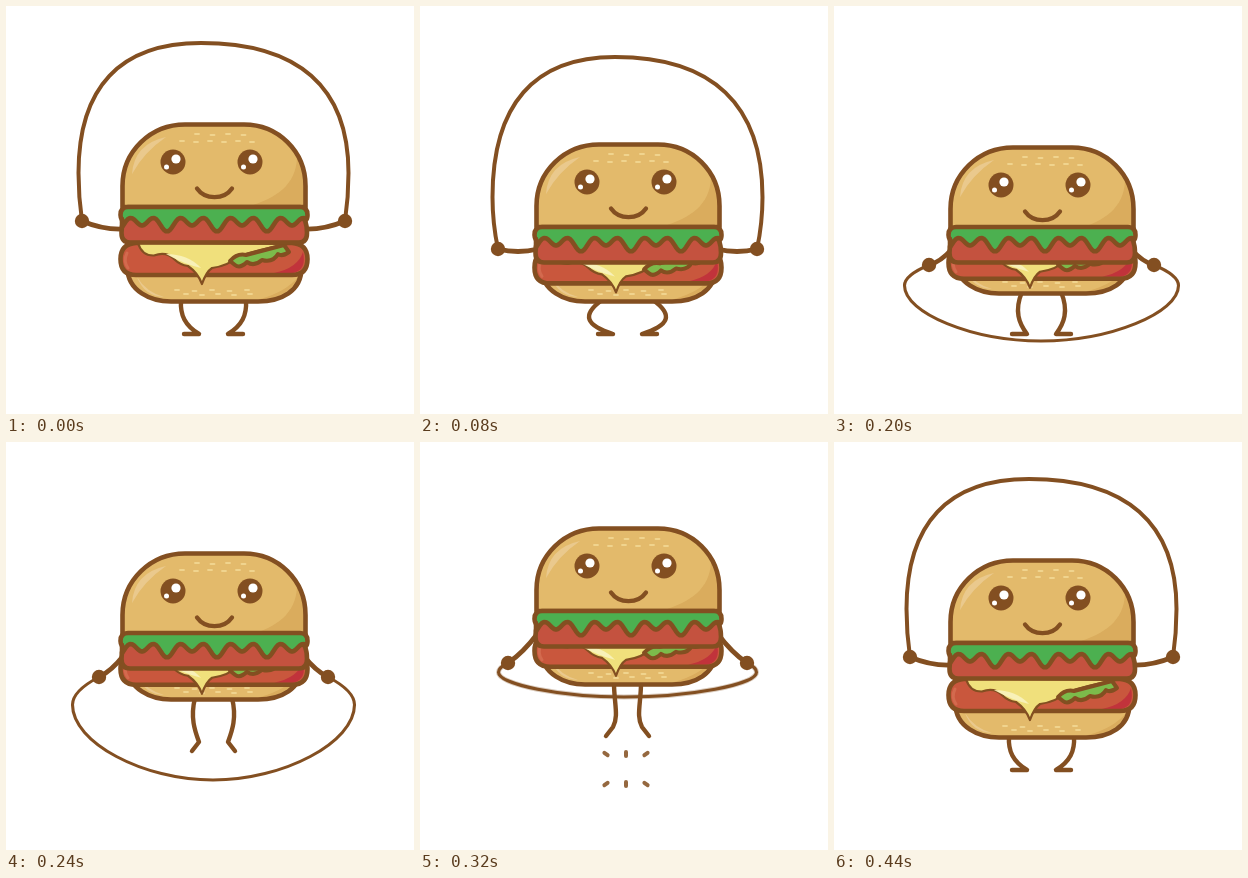
An HTML page with a canvas for the animation above (0.48 s loop, 408 px wide and 408 px high).

```html
<!DOCTYPE html>
<html lang="en">
<head>
<meta charset="utf-8">
<title>Burger skipping rope</title>
<style>
html, body { margin: 0; width: 100%; height: 100%; overflow: hidden; background: #fff; }
canvas { display: block; }
</style>
</head>
<body>
<canvas id="stage" width="408" height="408"></canvas>
<script>
const ctx = document.getElementById('stage').getContext('2d');
const BROWN = '#834f21', BUN = '#e3ba6b', SHADE = '#daac5d', SHINE = '#eac98d', SEED = '#f0d48e';
const STEP = 40, STEPS = 12, CENTER = 207.5, GROUND = 328, OUTLINE = 4.6;

// rise: shift of the bottom bun; squash: how far the layers above sink onto it
const stand = { rise: 0, squash: 0, handX: 76, handY: 215, reach: 135, ropeX: 195, ropeY: 37, hip: 175, knee: 174 };
const squat = { rise: 0, squash: 20, handX: 78, handY: 243, reach: 135, ropeX: 195, ropeY: 51, hip: 182, knee: 161 };
const push = { rise: -8, squash: 28, handX: 95, handY: 259, reach: 137, ropeX: 207, ropeY: 335, hip: 188, knee: 180 };
const leap = { rise: -38, squash: 28, handX: 93, handY: 235, reach: 141, ropeX: 207, ropeY: 338, hip: 189, knee: 184 };
const hang = { rise: -53, squash: 21, handX: 88, handY: 221, reach: 129, ropeX: 204, ropeY: 255, hip: 194, knee: 194 };
const fall = { rise: -52, squash: 22, handX: 88, handY: 223, reach: 128, ropeX: 216, ropeY: 57, hip: 193, knee: 192 };

function mix(a, b, t, bounce = 0, ropeLift = 0) {
  const out = {};
  for (const key in a) out[key] = a[key] + (b[key] - a[key]) * t;
  out.rise -= bounce;
  out.ropeY -= ropeLift;
  return out;
}

const poses = [
  stand, mix(stand, squat, .5, 0, 15), squat, mix(squat, push, 1 / 3), mix(squat, push, 2 / 3), push,
  leap, mix(leap, hang, .55, 3), hang, mix(hang, fall, .5, 3), fall, stand
];

function shape(d, fill, width = 0, color = BROWN) {
  const path = new Path2D(d);
  if (fill) { ctx.fillStyle = fill; ctx.fill(path); }
  if (width) { ctx.lineWidth = width; ctx.strokeStyle = color; ctx.stroke(path); }
}

function dot(x, y, r, color = BROWN) {
  ctx.fillStyle = color;
  ctx.beginPath();
  ctx.arc(x, y, r, 0, 7);
  ctx.fill();
}

function shifted(dy, draw) {
  ctx.save();
  ctx.translate(0, dy);
  draw();
  ctx.restore();
}

function bothSides(draw) {
  draw();
  ctx.save();
  ctx.translate(2 * CENTER, 0);
  ctx.scale(-1, 1);
  draw();
  ctx.restore();
}

function seedRow(x, y, gap, count) {
  for (let i = 0; i < count; i++) shape(`M${x + i * gap - 2} ${y + i % 2}h4`, null, 1.8, SEED);
}

// Lettuce edge: every second drip hangs deeper
function frill() {
  let d = '';
  for (let x = 116; x <= 300; x += 2) {
    const a = (x - 211) * Math.PI / 25;
    d += `L${x} ${217.3 + 5.2 * Math.cos(2 * a) + 3 * Math.cos(a)}`;
  }
  return d;
}

function topBun() {
  const d = 'M116.5 201V180C116.5 145 145 118.5 179 118.5H238C272 118.5 299.5 145 299.5 180V201Z';
  shape(d, BUN);
  shape('M291 147C292 175 275 190 247 199H298V176Q298 160 291 147Z', SHADE);
  shape('M160 131Q128 138 126 168Q138 146 160 131Z', SHINE);
  seedRow(191, 128, 15.5, 4);
  seedRow(176, 135, 14, 6);
  shape(d, null, OUTLINE);
  for (const x of [167, 244]) {
    dot(x, 156, 12.5);
    dot(x + 3, 153, 4.6, '#fff');
    dot(x - 6.5, 161, 2.5, '#fff');
  }
  shape('M191 182.5C199 194 218 194 226 182.5', null, 4.3);
}

function upperPatty() {
  const edge = frill(), leaf = 'M116 214Q114.5 212 114.5 209Q114.5 201 122 201H294Q301.5 201 301.5 209Q301.5 213 300 214';
  shape('M124 208H293Q301 212 301 227Q301 236.5 293 236.5H124Q115.5 236.5 115.5 227Q115.5 212 124 208Z', '#c4523f', OUTLINE);
  shape(leaf + 'L300 214L116 214', '#4cb050');
  shape('M116 213' + edge, '#4cb050', OUTLINE);
  shape(leaf, null, OUTLINE);
}

function lowerPatty() {
  const d = 'M130 237H286Q301.5 238 301.5 253Q301.5 269 286 269H130Q114.5 269 114.5 253Q114.5 238 130 237Z';
  shape(d, '#c9573d');
  shape('M297 246Q292 262 268 267H287Q301 264 297 246Z', '#c1333b');
  shape('M121 247Q117 255 122 262', null, 3, '#d36a4e');
  shape(d, null, OUTLINE);
  shape('M132 237Q136 250 148 249.5Q160 245 168 253Q174 259 182 260Q192 267 196 278Q200 266 206 262Q222 260 233 250Q255 243 282 238Z', '#f0e07c', 2.2);
  shape('M160 248Q182 248 195 262Q178 258 160 248Z', '#f8f1b8');
  shape('M224 255Q231 247 240 249L278 239L283 246Q276 251 272 248Q267 257 256 254Q248 261 241 256Q234 263 229 259Z', '#7cbb4b', 4);
}

function bottomBun() {
  const d = 'M121.5 262C121.5 285 145 295.5 165 295.5H252C275 295.5 295.5 285 295.5 262Z';
  shape(d, BUN);
  shape('M293 270Q280 286 254 293Q282 293 293 270Z', SHADE);
  shape('M131 271Q140 286 158 291Q138 290 131 271Z', SHINE);
  seedRow(171, 284, 17.5, 5);
  seedRow(180, 288, 16, 5);
  shape(d, null, OUTLINE);
}

function drawRope({ handX, handY, reach, ropeX, ropeY }, blurred) {
  const up = ropeY < handY, k = up ? .66 : .5;
  const sideY = handY + .27 * (ropeY - handY), endY = sideY + k * (ropeY - sideY), bendY = (handY + sideY) / 2;
  const left = CENTER - reach, right = CENTER + reach;
  const d = `M${handX} ${handY}Q${left} ${bendY} ${left} ${sideY}
    C${left} ${endY} ${ropeX + k * (left - ropeX)} ${ropeY} ${ropeX} ${ropeY}
    C${ropeX + k * (right - ropeX)} ${ropeY} ${right} ${endY} ${right} ${sideY}
    Q${right} ${bendY} ${2 * CENTER - handX} ${handY}`;
  if (blurred) shape(d, null, 5, 'rgba(131,79,33,.3)');
  shape(d, null, up ? 4 : 3.1);
}

// Feet stay on the ground until the legs are fully stretched
function drawLeg({ rise, hip, knee }) {
  const top = 294 + rise, foot = Math.min(GROUND, 338 + rise), length = foot - top;
  const toe = foot === GROUND ? 'h-15' : 'l-7 9';
  shape(`M${hip} ${top}C${knee} ${top + length * .45} ${knee + 5} ${top + length * .75} 193 ${foot}${toe}`, null, 4.4);
}

function drawArm({ handX, handY }, shoulderY) {
  shape(`M${handX} ${handY}Q${(handX + 118) / 2} ${(handY + shoulderY) / 2 + 5} 118 ${shoulderY}`, null, 4.8);
  dot(handX, handY, 7.2);
}

function drawDust(age) {
  const spread = .7 + .3 * age, half = 3 - age;
  for (const x of [-20, 0, 20]) for (const y of [-15, 15]) {
    const r = Math.hypot(x, y), a = spread - half / r, b = spread + half / r;
    shape(`M${206 + x * a} ${327 + y * a}L${206 + x * b} ${327 + y * b}`, null, 4, '#95683f');
  }
}

function draw(step) {
  const p = poses[step], inFront = step === 3 || step === 4;
  const upper = p.rise + p.squash, flatten = Math.max(0, p.squash - 22) / 2;
  ctx.fillStyle = '#fff';
  ctx.fillRect(0, 0, 408, 408);
  ctx.lineCap = ctx.lineJoin = 'round';
  bothSides(() => drawLeg(p));
  if (!inFront) drawRope(p, step === 8);
  bothSides(() => drawArm(p, upper + 223));
  shifted(p.rise, bottomBun);
  shifted(p.rise + .42 * p.squash, lowerPatty);
  shifted(upper + flatten, topBun);
  shifted(upper, upperPatty);
  if (inFront) drawRope(p);
  if (step >= 7 && step <= 9) drawDust(step - 7);
}

const start = performance.now();
function tick() {
  draw(Math.floor((performance.now() - start) / STEP) % STEPS);
  requestAnimationFrame(tick);
}
tick();
</script>
</body>
</html>
```
